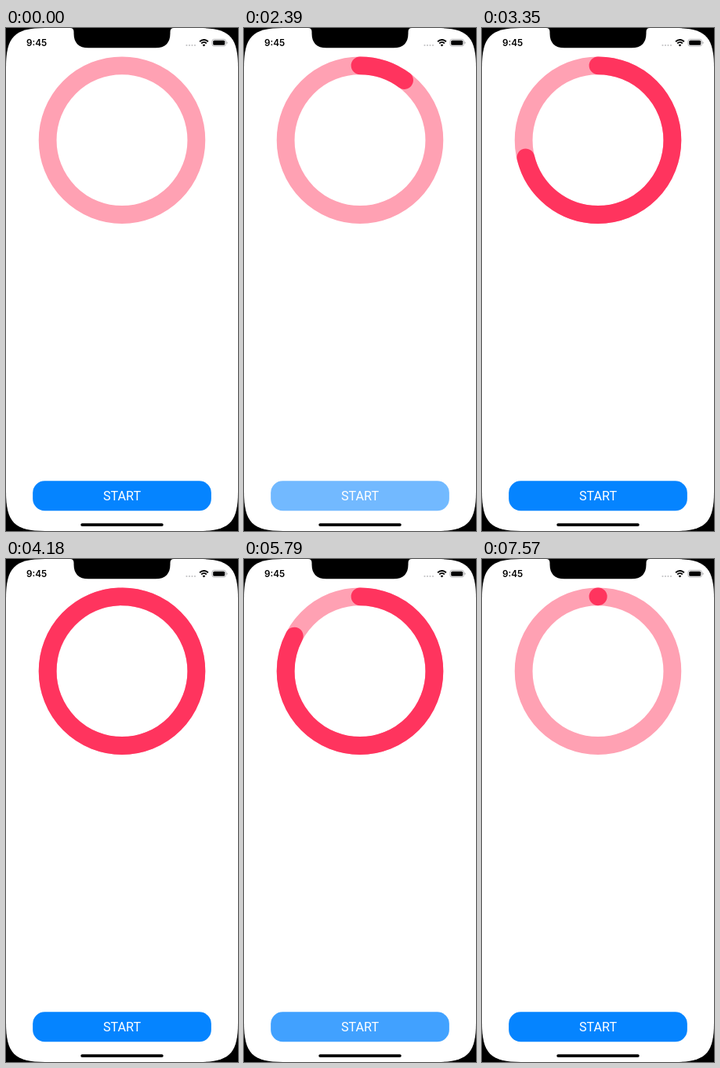
An HTML page for the animation above (7.65 s loop, 296 px wide and 640 px high).

```html
<!DOCTYPE html>
<html lang="en">
<head>
<meta charset="utf-8">
<title>Progress ring</title>
<style>
  html, body { margin: 0; width: 100%; height: 100%; overflow: hidden; background: #000; }
  svg { display: block; width: 296px; height: 640px; }
  .ring { fill: none; stroke-width: 22.8; }
  .clock { font: 600 11.7px Inter, sans-serif; }
  .label { font: 400 16.2px Roboto, sans-serif; fill: #fff; }
  .dots { fill: none; stroke: #c4c4c6; stroke-width: 2.2; stroke-linecap: round; stroke-dasharray: 0 3.5; }
  text { text-anchor: middle; }
</style>
</head>
<body>
<svg viewBox="0 0 296 640">
  <path fill="#fff" d="M0 50C0 11 11 0 50 0H246C285 0 296 11 296 50V590C296 629 285 640 246 640H50C11 640 0 629 0 590Z"/>
  <path d="M82 0Q86.500 0 86.500 5V7C86.500 19 93 25.300 105 25.300H191C203 25.300 209.500 19 209.500 7V5Q209.500 0 214 0Z"/>

  <text class="clock" x="39.200" y="23">9:45</text>
  <path class="dots" d="M230.500 22h10.600"/>
  <g fill="none" stroke="#000" stroke-width="1.900">
    <path d="M247.100 17.300a7.640 7.640 0 0 1 10.800 0"/>
    <path d="M249.200 19.600a4.670 4.670 0 0 1 6.600 0"/>
  </g>
  <path d="M252.500 23.500l-1.900-1.900a2.700 2.700 0 0 1 3.800 0z"/>
  <rect x="262.900" y="14.400" width="17.600" height="8.700" rx="2.600" fill="none" stroke="#a5a5a8" stroke-width=".8"/>
  <rect x="264.200" y="15.700" width="15" height="6.100" rx="1.500"/>
  <path fill="#a5a5a8" d="M281.500 17.300q1.200 .4 1.200 1.500t-1.200 1.500z"/>

  <g class="ring" transform="translate(148 142.650) rotate(-90)">
    <circle r="94.870" stroke="#ffa1b3"/>
    <circle id="arc" r="94.870" stroke="#ff345e" stroke-linecap="round" pathLength="1" visibility="hidden"/>
  </g>

  <g id="button">
    <rect x="34.150" y="576.300" width="227.700" height="37.950" rx="15.200" fill="#0584ff"/>
    <text class="label" x="148" y="601">START</text>
  </g>
  <rect x="95.250" y="630.200" width="105.500" height="3.800" rx="1.900"/>
</svg>
<script>
  const LOOP = 7650, FADE = 420;
  const fillTap = { down: 1940, up: 2248, span: 2057 };
  const emptyTap = { down: 5260, up: 5575, span: 2000 };

  // The screen refreshes in bursts of evenly spaced steps.
  const bursts = [
    { from: 0, step: LOOP, count: 1 },
    { from: fillTap.down, step: LOOP, count: 1 },
    { from: 2270, step: 106, count: 19 },
    { from: emptyTap.down, step: LOOP, count: 1 },
    { from: 5590, step: 100, count: 10 },
    { from: 6610, step: 106.6, count: 10 }
  ];

  const arc = document.getElementById('arc');
  const button = document.getElementById('button');

  function lastRefresh(t) {
    const { from, step, count } = bursts.filter(b => b.from <= t).pop();
    return from + step * Math.min(count - 1, Math.floor((t - from) / step));
  }

  // cubic-bezier(0, 0, .58, 1)
  function easeOut(x) {
    if (x <= 0) return 0;
    if (x >= 1) return 1;
    let lo = 0, hi = 1, s = 0.5;
    for (let i = 0; i < 24; i++) {
      s = (lo + hi) / 2;
      if (1.74 * (1 - s) * s * s + s * s * s < x) lo = s; else hi = s;
    }
    return s * s * (3 - 2 * s);
  }

  const progress = (tap, t) => easeOut((t - tap.up) / tap.span);

  function opacity(t) {
    if (t < fillTap.down) return 1;
    const tap = t < emptyTap.down ? fillTap : emptyTap;
    return 0.2 + 0.8 * easeOut((t - tap.up) / FADE);
  }

  function draw(t) {
    const part = progress(fillTap, t) - progress(emptyTap, t);
    arc.setAttribute('visibility', part > 0 ? 'visible' : 'hidden');
    arc.setAttribute('stroke-dasharray', part >= 1 ? 'none' : Math.max(part, 0.0005) + ' 2');
    button.setAttribute('opacity', opacity(t));
  }

  const start = performance.now();
  function frame() {
    draw(lastRefresh((performance.now() - start) % LOOP));
    requestAnimationFrame(frame);
  }
  frame();
</script>
</body>
</html>
```
